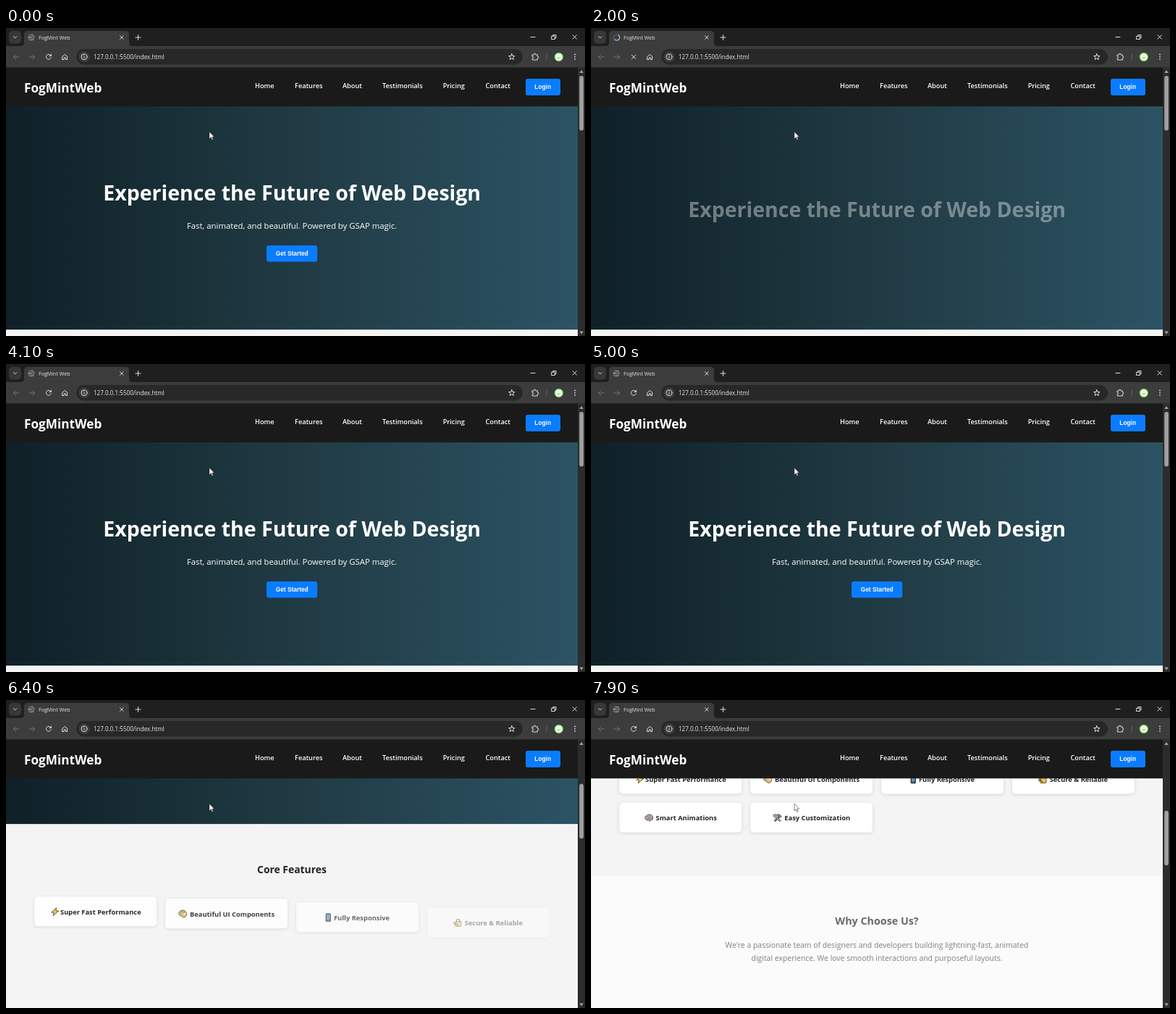
These frames come from a looping animation (800x425 px, 8000 ms). An HTML page:

```html
<!DOCTYPE html>
<html lang="en">
<head>
<meta charset="utf-8">
<title>FogMint Web</title>
<style>
  html, body { margin: 0; width: 100%; height: 100%; overflow: hidden; background: #1f1f1f; }
  svg { display: block; width: 800px; height: 425px; }
  text { font-family: "Open Sans", "Noto Sans", sans-serif; }
  .bold { font-weight: 700; }
  .mid { text-anchor: middle; }
  .button { font: 700 8.33px "Liberation Sans", Arial, sans-serif; text-anchor: middle; fill: #fff; }
  .nav { font-size: 9.2px; font-weight: 600; fill: #fff; }
  .line { fill: none; stroke: #dedede; stroke-width: 1; stroke-linecap: round; stroke-linejoin: round; }
  .ink { stroke: #222; stroke-width: .7; stroke-linejoin: round; }
  .card rect.face { fill: #fff; filter: drop-shadow(0 1px 2.5px rgba(0, 0, 0, .13)); }
</style>
</head>
<body>
<svg viewBox="0 0 800 425" xmlns="http://www.w3.org/2000/svg">
  <defs>
    <linearGradient id="heroFill">
      <stop offset="0" stop-color="#0f2027"/>
      <stop offset=".5" stop-color="#203a43"/>
      <stop offset="1" stop-color="#2c5364"/>
    </linearGradient>
  </defs>

  <rect width="800" height="425" fill="#f4f4f5"/>
  <g id="page">
    <rect y="108" width="790" height="308.2" fill="url(#heroFill)"/>
    <g fill="#fff" class="mid">
      <text id="headline" class="bold" x="395.2" y="238.3" font-size="28.5">Experience the Future of Web Design</text>
      <text id="tagline" x="395" y="277" font-size="11.35">Fast, animated, and beautiful. Powered by GSAP magic.</text>
    </g>
    <g id="start">
      <rect x="360" y="300" width="70.2" height="22.5" rx="3" fill="#0a7cff"/>
      <text class="button" x="395.2" y="314.2">Get Started</text>
    </g>
    <text id="coreTitle" class="bold mid" x="395" y="484" font-size="13.9" fill="#222">Core Features</text>
    <g id="cards"></g>
    <g id="about">
      <rect y="661" width="790" height="300" fill="#fff"/>
      <text class="bold mid" x="395" y="729" font-size="14.3" fill="#222">Why Choose Us?</text>
      <g class="mid" font-size="10.44" fill="#444">
        <text x="395" y="760.2">We're a passionate team of designers and developers building lightning-fast, animated</text>
        <text x="395" y="778.2">digital experience. We love smooth interactions and purposeful layouts.</text>
      </g>
    </g>
  </g>

  <g id="navbar">
    <rect y="54" width="790" height="54.2" fill="#1a1a1a"/>
    <text class="bold" x="25" y="89" font-size="17.2" fill="#fff">FogMintWeb</text>
    <rect x="718" y="70" width="48" height="23" rx="3" fill="#0a7cff"/>
    <text class="button" x="741.7" y="84.4">Login</text>
  </g>

  <rect x="790" y="54" width="10" height="371" fill="#2c2c2c"/>
  <path d="M792.3 62l2.8-4 2.8 4zM792.3 418.5l2.8 4 2.8-4z" fill="#9f9f9f"/>
  <rect id="thumb" x="792.2" y="66" width="5.8" height="75.5" rx="2.9" fill="#9f9f9f"/>

  <g id="browser">
    <rect width="800" height="26" fill="#1f1f1f"/>
    <rect y="25" width="800" height="29.3" fill="#3c3c3c"/>
    <path d="M20 25q5 0 5-5V9q0-5 5-5H165q5 0 5 5v11q0 5 5 5z" fill="#3c3c3c"/>
    <rect x="4" y="4" width="17" height="17.5" rx="5" fill="#383838"/>
    <path class="line" d="M10.3 11.7l2.2 2.2 2.2-2.2"/>
    <g id="globe">
      <circle cx="35" cy="13" r="4.6" fill="#7b7f83"/>
      <path d="M31.5 11q2-2 3 0t3 0M32 15.5q2-2 3.5 0M36 14.5q1.5-1.5 2.5 0" fill="none" stroke="#3c3c3c" stroke-width="1.2"/>
    </g>
    <g id="spinner" fill="none" stroke-width="1.2" stroke-linecap="round">
      <circle cx="35.5" cy="13" r="4" stroke="#596370"/>
      <path d="M35.5 9a4 4 0 0 1 0 8" stroke="#a8c7fa"/>
    </g>
    <text x="45" y="15.8" font-size="7.1" fill="#e3e3e3">FogMint Web</text>
    <path class="line" d="M157.5 10.7l4.6 4.6m0-4.6l-4.6 4.6M179 13h7m-3.5-3.5v7"/>
    <path class="line" d="M725 12.5h6M783 9.7l5.4 5.4m0-5.4l-5.4 5.4M754 11.2h4.3v4.3h-4.3zM755.7 11V9.6h4.3v4.3h-1.5"/>

    <path class="line" d="M17.8 40h-7.3m3.2-3.3l-3.3 3.3 3.3 3.3M32.2 40h7.3m-3.2-3.3l3.3 3.3-3.3 3.3" style="stroke:#757575"/>
    <path id="reload" class="line" d="M62 38.1a3.5 3.5 0 1 0 .3 2.7M62.4 36.2v2.3h-2.4"/>
    <path id="stop" class="line" d="M56.2 37.2l5.4 5.4m0-5.4l-5.4 5.4"/>
    <path class="line" d="M78 39.3l3.3-2.8 3.3 2.8v4.2h-2.2v-2.6h-2.2v2.6H78z"/>
    <rect x="97" y="29" width="617" height="21.5" rx="10.7" fill="#282828"/>
    <circle cx="108" cy="39.8" r="7.5" fill="#3c3c3c"/>
    <circle class="line" cx="108" cy="39.8" r="3.9"/>
    <path class="line" d="M108 39.5v2M108 37.8v.1"/>
    <text x="121" y="42.8" font-size="8.09" fill="#e8e8e8">127.0.0.1:5500/index.html</text>
    <path id="star" class="line"/>
    <path class="line" d="M727.3 37h2.3q-.2-1.9 1.2-1.9t1.2 1.9h2.4v2.3q1.5 0 1.5 1.2t-1.5 1.2v2.3h-7.1v-2.2q1.5 0 1.5-1.3t-1.5-1.2z"/>
    <path d="M747 35v9.5" stroke="#606060"/>
    <circle cx="763.8" cy="40" r="5.7" fill="#f4fbea" stroke="#4ac431" stroke-width="1.1"/>
    <path d="M760.5 40.5q3.3 4 6.6 0z" fill="#a9d98a"/>
    <g fill="#dedede"><circle cx="786" cy="36.5" r=".9"/><circle cx="786" cy="39.8" r=".9"/><circle cx="786" cy="43.1" r=".9"/></g>
  </g>

  <path id="arrow" d="M281 143.2v9.7l2.2-2.1 1.5 3.5 1.5-.7-1.5-3.4h2.9z" fill="#fff" stroke="#333" stroke-width=".6"/>
  <path id="beam" d="M284.8 145.3q2.5 0 2.5 1.2v7.3q0 1.2-2.5 1.2M289.8 145.3q-2.5 0-2.5 1.2v7.3q0 1.2 2.5 1.2" fill="none" stroke="#080808" stroke-width=".9"/>
</svg>

<script>
const LOOP = 8000;
const RISE = 25;            // travel of the scroll-in elements
const TICK = 62.5;          // one wheel step
const wheelTimes = [5150, 5543, 5900, 6258, 7092, 7440, 7788];
const loading = { from: 800, swap: 1700, to: 2500 };

const $ = id => document.getElementById(id);
const clamp = v => Math.max(0, Math.min(1, v));
const easeOut = (t, start, length, power = 2) => 1 - (1 - clamp((t - start) / length)) ** power;
const show = (id, on) => $(id).setAttribute("visibility", on ? "visible" : "hidden");

function reveal(el, amount, rise) {
  el.setAttribute("opacity", amount);
  el.setAttribute("transform", `translate(0 ${(1 - amount) * rise})`);
}

// Icons sit in a 12 by 12 box.
const icons = {
  bolt: `<path class="ink" d="M7.5.6L.8 7h3.6L3 11.5 11 4.9H7z" fill="#ffc83d"/>`,
  palette: `<path class="ink" d="M6 1C2 1 .6 4 .8 6.3 1 9 4 8 5 9.2c.6 1.8 2 2.3 3.6 1.7C11 10 11.8 7.8 11.5 5.5 11 2.6 9 1 6 1z" fill="#e8c06a"/>
    <circle cx="3.2" cy="5.5" r="1" fill="#3a96dd"/><circle cx="5" cy="3.2" r="1" fill="#e74856"/><circle cx="8" cy="3.5" r="1" fill="#16a05d"/><circle cx="9.3" cy="6.2" r="1" fill="#fff"/>`,
  phone: `<rect class="ink" x="1" y=".6" width="6.5" height="11" rx="1" fill="#383838"/><rect x="2" y="2" width="4.5" height="7.5" fill="#4d9cc7"/><path d="M3.5 10.5h1.5" stroke="#ccc" stroke-width=".6"/>`,
  lock: `<path d="M5 5V3.2q0-2 2.2-2t2.2 2V5" fill="none" stroke="#444" stroke-width="1.3"/><rect class="ink" x="3" y="4.5" width="8.5" height="6.8" rx="1" fill="#f2bd42"/>
    <circle class="ink" cx="2.6" cy="6.8" r="1.6" fill="#d99b38"/><path d="M3.8 7.8l3.2 2.5" stroke="#4a3515" stroke-width="1.1"/>`,
  brain: `<path class="ink" d="M2 8.5C-.3 7 .6 3.5 3 3c1-2 4-2 5-1 2.5 0 4 2.5 3.4 4.5.4 2-1.2 3-3 2.6L7 10.8 5.5 9Q3.5 10 2 8.5z" fill="#b9a6a8"/><path d="M2.5 5q2-1.5 3 .3t3-1M4 7.5q2-1 3.5 0M8 6.5q1.5.8 2.3-.5" fill="none" stroke="#685b60" stroke-width=".6"/>`,
  tools: `<path d="M2 10.5L8.5 4" stroke="#222" stroke-width="2.6"/><path d="M2 10.5L8.5 4" stroke="#c77b3c" stroke-width="1.4"/>
    <path class="ink" d="M5.5 1.5Q8.5.3 10.5 3l1 1-2 2L6.8 3.3z" fill="#8d9399"/>
    <path class="ink" d="M1 1.5l1.8.8.7-1.5q1.8 1 1 3l6 6-1.4 1.5-5.9-6q-2 .3-2.7-1.7z" fill="#b6bcc1"/>`
};

const cardData = [
  ["bolt", 62, 75, "Super Fast Performance"],
  ["palette", 238, 254, "Beautiful UI Components"],
  ["phone", 441, 453, "Fully Responsive"],
  ["lock", 617.5, 633.7, "Secure &amp; Reliable"],
  ["brain", 74, 89.5, "Smart Animations"],
  ["tools", 251.7, 267.3, "Easy Customization"]
];
$("cards").innerHTML = cardData.map(([icon, iconX, textX, label], i) => {
  const x = 39.3 + 180.9 * (i % 4), y = 515.7 + 53.3 * Math.floor(i / 4);
  return `<g class="card"><rect class="face" x="${x}" y="${y}" width="168.8" height="41" rx="5"/>
    <g transform="translate(${iconX} ${y + 14.8})">${icons[icon]}</g>
    <text class="bold" x="${textX}" y="${y + 24.3}" font-size="9.33" fill="#222">${label}</text></g>`;
}).join("");
const cards = [...$("cards").children];

const links = { Home: 344, Features: 399, About: 465, Testimonials: 520, Pricing: 603.7, Contact: 662.5 };
$("navbar").insertAdjacentHTML("beforeend", Object.entries(links)
  .map(([label, x]) => `<text class="nav" x="${x}" y="82.5">${label}</text>`).join(""));

$("star").setAttribute("d", "M" + Array.from({ length: 10 }, (_, i) => {
  const r = i % 2 ? 1.9 : 4.4, a = Math.PI * (i / 5 - .5);
  return `${698.8 + r * Math.cos(a)} ${40 + r * Math.sin(a)}`;
}).join("L") + "Z");

function draw(t) {
  const scroll = wheelTimes.reduce((sum, start) => sum + TICK * easeOut(t, start, 250, 3), 0);
  $("page").setAttribute("transform", `translate(0 ${-scroll})`);
  $("thumb").setAttribute("y", 66 + scroll * .203);

  const busy = t >= loading.from && t < loading.to;
  show("spinner", busy);
  show("stop", busy);
  show("globe", !busy);
  show("reload", !busy);
  $("spinner").setAttribute("transform", `rotate(${(t - 2000) * .4 + 40} 35.5 13)`);

  const intro = start => t < loading.swap ? 1 : easeOut(t, start, 1000);
  reveal($("headline"), intro(1783), 37.5);
  reveal($("tagline"), intro(2283), RISE);
  const pop = intro(2783), size = .8 + .2 * pop;
  $("start").setAttribute("opacity", pop);
  $("start").setAttribute("transform", `translate(395.2 311.3) scale(${size}) translate(-395.2 -311.3)`);

  reveal($("coreTitle"), easeOut(t, 5290, 1000), RISE);
  cards.forEach((card, i) => reveal(card, easeOut(t, 5575 + 207 * i, 1000), RISE));
  reveal($("about"), easeOut(t, 7490, 1000), RISE);

  // The pointer becomes a text cursor while a line of text passes under it.
  const overText = [[60, 104], [118, 134], [385, 399]].some(([from, to]) => scroll > from && scroll < to);
  show("arrow", !overText);
  show("beam", overText);
}

const began = performance.now();
function frame() {
  draw((performance.now() - began) % LOOP);
  requestAnimationFrame(frame);
}
draw(0);
frame();
</script>
</body>
</html>
```
